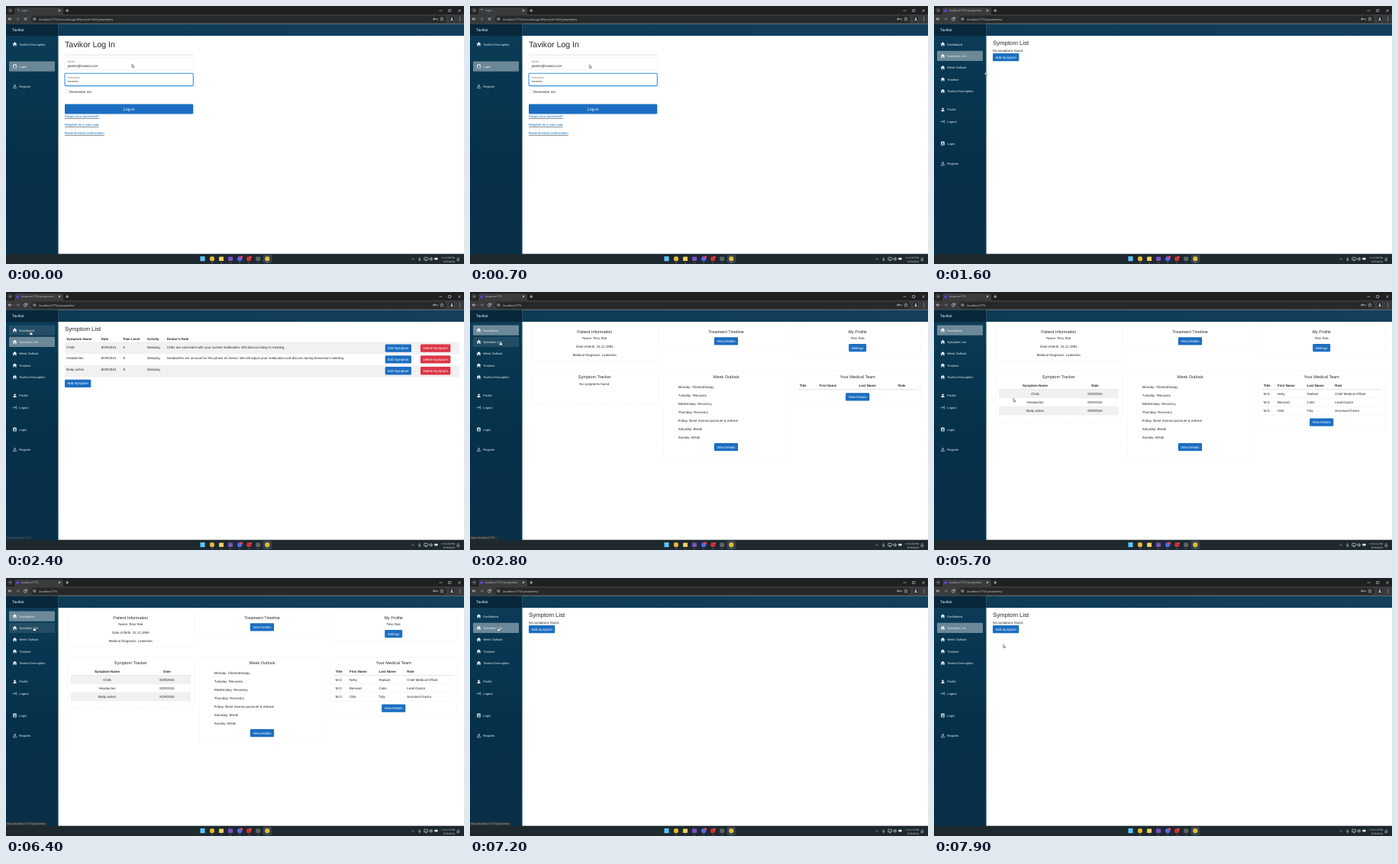
Animation, 600 px wide and 338 px high, one loop 8000 ms. Source, as an HTML page:

```html
<!DOCTYPE html>
<html lang="en">
<head>
<meta charset="utf-8">
<title>Patient portal</title>
<style>
html, body { margin: 0; width: 100%; height: 100%; overflow: hidden; background: #fff; }
svg { display: block; width: 600px; height: 338px; text-rendering: geometricPrecision; }
text { font: 4.38px "Liberation Sans", Arial, sans-serif; fill: #24282c; white-space: pre; }
.ui { font-family: "Open Sans", "Noto Sans", sans-serif; }
.b { font-weight: bold; }
.m { text-anchor: middle; }
.e { text-anchor: end; }
.line { fill: none; stroke: #d5d5d5; stroke-width: .8; stroke-linecap: round; stroke-linejoin: round; }
.card { fill: none; stroke: #f1f1f1; stroke-width: .6; stroke-dasharray: 3 1; }
</style>
</head>
<body>
<svg id="stage" viewBox="0 0 600 338"></svg>
<script>
const LOOP = 8000, BLUE = '#1b6ec2', RED = '#dc3545', WHITE = '#f4f6f8';
const APP = 'Tavikor', PATIENT = 'Tess Roe';

// Drawing helpers returning SVG markup
const text = (x, y, s, cls = '', size = 4.38, fill = '#24282c') =>
  `<text x="${x}" y="${y}" class="${cls}" style="font-size:${size}px;fill:${fill}">${s}</text>`;
const rect = (x, y, w, h, fill, r = 0, more = '') =>
  `<rect x="${x}" y="${y}" width="${w}" height="${h}" rx="${r}" fill="${fill}" ${more}/>`;
const disc = (x, y, r, fill) => `<circle cx="${x}" cy="${y}" r="${r}" fill="${fill}"/>`;
const line = (d, color = '#d5d5d5', width = .8) =>
  `<path class="line" d="${d}" style="stroke:${color};stroke-width:${width}"/>`;
const button = (x, y, w, s, fill = BLUE, h = 10.3, size = 4.38) =>
  rect(x, y, w, h, fill, 1.3) + text(x + w / 2, y + h / 2 + size * .35, s, 'm', size, '#fff');
const card = (x, y, h, w = 166) => `<rect class="card" x="${x}" y="${y}" width="${w}" height="${h}" rx="1.5"/>`;
const at = (x, y, s) => `<g transform="translate(${x} ${y})">${s}</g>`;
// A group visible only during the given [from, to) spans
const during = (spans, s) => `<g data-on="${spans}">${s}</g>`;

const ON = {
  login: '0-1000', user: '1000-8000',
  list: '1000-2600,7200-8000', listEmpty: '1000-2000,7200-8000', listFull: '2000-2600',
  dash: '2600-7200', dashEmpty: '2600-3400', dashFull: '3400-7200',
  busy: '0-1000,6700-7200', idle: '1000-6700,7200-8000'
};

function browser() {
  const address = (tab, url) => text(20, 7.4, tab, 'ui', 3.3, '#d6d6d6') + text(43, 18.6, url, 'ui', 3.6, '#e4e4e4');
  return rect(0, 0, 600, 11.5, '#1f2021') + rect(0, 11, 600, 12.5, '#3a3b3c') +
    rect(2, 2.3, 7, 7, '#343536', 2) + line('M4.3 5.2l1.2 1.2 1.2-1.2') +
    `<path d="M9 11.5q2 0 2-2V4q0-2 2-2h60q2 0 2 2v5.5q0 2 2 2z" fill="#3a3b3c"/>` +
    line('M69 4.9l2 2m0-2l-2 2M78.5 6h3.4M80.2 4.3v3.4') +
    line('M568 6h3M580 4.6h2.8v2.8h-2.8zM592.6 4.6l2.8 2.8m0-2.8l-2.8 2.8', '#d5d5d5', .6) +
    rect(32.5, 12.7, 544.5, 9, '#272829', 4.5) +
    line('M7.2 17H3.4m1.6-1.7L3.4 17 5 18.7') + line('M13.2 17h3.8m-1.6-1.7L17 17l-1.6 1.7', '#777') +
    during(ON.busy, line('M24 15.5l3 3m0-3l-3 3') + '<path id="spinner" class="line" d="M15.3 4.2a2 2 0 0 1 2 2" style="stroke:#8ab4f8"/>') +
    during(ON.idle, line('M27 16.2a1.9 1.9 0 1 0 .2 1.3M27.2 14.9v1.4h-1.4') + disc(15.3, 6.2, 2.1, '#5c3fc4') ) +
    disc(37.3, 17, 2.7, '#3c3d3e') + line('M36 16.2h2.6M36 17.8h2.6', '#d5d5d5', .6) +
    during(ON.login, address('Log in', 'localhost:7775/Account/Login?ReturnUrl=%2Fsymptomlist')) +
    during(ON.list, address('localhost:7775/symptomlist', 'localhost:7775/symptomlist')) +
    during(ON.dash, address('localhost:7775', 'localhost:7775')) +
    line('M562 17h3.4v1M561.6 17a1 1 0 1 0-2 0 1 1 0 1 0 2 0', '#d5d5d5', .7) +
    line('M571 14.8l.7 1.5 1.6.2-1.2 1.1.3 1.6-1.4-.8-1.4.8.3-1.6-1.2-1.1 1.6-.2z', '#d5d5d5', .5) +
    disc(584, 17, 2.9, '#1b1c1d') + disc(584, 16.1, 1, '#ddd') + rect(582.2, 17.5, 3.6, 1.6, '#ddd', .8) +
    [15, 17, 19].map(y => disc(594.5, y, .5, '#ddd')).join('');
}

const icons = {
  home: '<path d="M0-2.7L2.8 0H2v2.5H.7V.7H-.7v1.8H-2V0h-.8z" fill="#f4f6f8"/>',
  person: disc(0, -1.2, 1.2, WHITE) + '<path d="M-2.3 2.2q0-2 2.3-2t2.3 2z" fill="#f4f6f8"/>',
  exit: line('M-2.4 0H.8M-.4-1.1L.8 0-.4 1.1M2.2-1.8v3.6', '#cdd7de', .6),
  badge: rect(-2.2, -2.5, 4.4, 5, WHITE, .6) + disc(0, -.7, .9, '#0b3750') + rect(-1.4, .6, 2.8, 1.2, '#0b3750', .5),
  outline: `<circle class="line" cy="-1.1" r="1" style="stroke-width:.6"/>` + line('M-2.2 2q.2-1.7 2.2-1.7T2.2 2z', '#cdd7de', .6)
};
const navItem = ([label, y, icon]) => at(11.5, y, icons[icon]) + text(17.3, y + 1.5, label, '', 4.05, '#e3ebf0');
const marker = (y, alpha) => rect(4, y - 6.6, 60, 13.3, `rgba(255,255,255,${alpha})`, 1.2);

function sidebar() {
  const guest = [[APP + ' Description', 50, 'home'], ['Login', 79, 'badge'], ['Register', 105.3, 'outline']];
  const member = [['Dashboard', 50, 'home'], ['Symptom List', 65.4, 'home'], ['Week Outlook', 80.8, 'home'],
    ['Timeline', 96.1, 'home'], [APP + ' Description', 111.4, 'home'], ['Profile', 135.8, 'person'],
    ['Logout', 151.3, 'exit'], ['Login', 180, 'badge'], ['Register', 206.4, 'outline']];
  return rect(0, 23.5, 68.5, 302, 'url(#side)') + rect(0, 23.5, 68.5, 15.5, '#08273a') +
    rect(68.5, 23.5, 532, 15.5, 'url(#top)') + text(8, 33, APP, '', 5, '#fff') +
    during(ON.login, marker(79, .4) + guest.map(navItem).join('')) +
    during(ON.list, marker(65.4, .4)) + during(ON.dash, marker(50, .4)) +
    during('2250-2600', marker(50, .1)) + during('2700-3000,6200-7200', marker(65.4, .1)) +
    during(ON.user, member.map(navItem).join(''));
}

function loginPage() {
  const links = ['Forgot your password?', 'Register as a new user', 'Resend email confirmation'];
  return text(77, 54, APP + ' Log In', '', 10.6) + rect(77, 63.7, 168.5, .6, '#ccc') +
    rect(77, 68, 168.5, 15.5, '#fff', 1.3, 'stroke="#e6e8ea" stroke-width=".5"') +
    text(80.7, 74, 'Email', '', 3.6, '#777') + text(80.7, 79.9, `patient@${APP.toLowerCase()}.com`) +
    rect(77, 88.3, 168.3, 16.3, '#fff', 1.3, 'stroke="#3b8fe0" stroke-width="1.1"') +
    text(80.7, 94.6, 'Password', '', 3.6, '#777') +
    Array.from({ length: 9 }, (_, i) => disc(81.5 + i * 1.55, 98.8, .62, '#24282c')).join('') +
    rect(77.3, 109.8, 4.3, 4.3, '#fff', .8, 'stroke="#d0d3d6" stroke-width=".5"') + text(83, 113.6, 'Remember me') +
    button(77, 128.4, 168.3, 'Log in', BLUE, 13, 5.3) +
    links.map((s, i) => `<g text-decoration="underline">${text(77, 146.4 + i * 10.9, s, '', 4.38, '#006bb7')}</g>`).join('');
}

const symptoms = ['Chills', 'Headaches', 'Body aches'];

function listPage() {
  const cols = [79.3, 124.7, 153.5, 184.7, 210.8];
  const heads = ['Symptom Name', 'Date', 'Pain Level', 'Activity', "Doctor's Note"];
  const notes = ['Chills are consistent with your current medication. Will discuss today in meeting.',
    'Headaches are unusual for this phase of chemo. We will adjust your medication and discuss during tomorrow\'s meeting.', ''];
  const row = (name, i) => {
    const y = 66.5 + i * 14.8;
    return rect(77, y, 517, 14.8, i % 2 ? '#fff' : '#f1f1f1') + rect(77, y + 14.6, 517, .4, '#dee2e6') +
      [name, '8/29/2024', i ? 8 : 5, 'Sleeping', notes[i]].map((s, c) => text(cols[c], y + 7, s)).join('') +
      button(496.7, y + 2, 34.3, 'Edit Symptom') + button(543, y + 2, 39.3, 'Delete Symptom', RED);
  };
  return text(77, 51.2, 'Symptom List', '', 7.8) +
    during(ON.listEmpty, text(77, 60.2, 'No symptoms found.') + button(77, 62, 34.3, 'Add Symptom')) +
    during(ON.listFull, heads.map((s, c) => text(cols[c], 62.5, s, 'b')).join('') +
      rect(77, 66.1, 517, .5, '#c9cccf') + symptoms.map(row).join('') + button(77, 114.8, 34.3, 'Add Symptom'));
}

function dashboard() {
  const [A, B, C] = [163.3, 335.5, 507.7];
  const title = (x, y, s) => text(x, y, s, 'm', 5.48);
  const week = ['Monday: Chemotherapy', 'Tuesday: Recovery', 'Wednesday: Recovery', 'Thursday: Recovery',
    'Friday: Bone marrow puncture &amp; release', 'Saturday: Break', 'Sunday: Break'];
  const info = ['Name: ' + PATIENT, 'Date of Birth: 31.12.1994', 'Medical Diagnosis: Leukemia'];
  const heads = ['Title', 'First Name', 'Last Name', 'Role'];
  const cols = [431.7, 450, 488.5, 525.3];
  const team = [['M.D.', 'Nelly', 'Radiant', 'Chief Medical Officer'],
    ['M.D.', 'Bernard', 'Calm', 'Lead Doctor'], ['M.D.', 'Ollie', 'Tidy', 'Assistant Doctor']];
  const rowY = i => 127.8 + i * 11.1;
  const details = (x, y) => button(x - 15.6, y, 31.2, 'View Details');
  const sickRow = (s, i) => rect(85, rowY(i), 157, 11.1, i % 2 ? '#fff' : '#f1f1f1') +
    rect(85, rowY(i) + 10.9, 157, .35, '#dee2e6') +
    text(132.5, rowY(i) + 7, s, 'm') + text(211, rowY(i) + 7, '8/29/2024', 'm');
  const teamRow = (r, i) => r.map((s, c) => text(cols[c], rowY(i) + 7, s)).join('') +
    rect(429, rowY(i) + 10.9, 157, .35, '#e3e6e9');
  return card(81, 43.3, 47) + card(253, 43.3, 30) + card(425, 43.3, 39) + card(253, 103.5, 113.5) +
    title(A, 53.6, 'Patient Information') + info.map((s, i) => text(A, 62.1 + i * 10.9, s, 'm')).join('') +
    title(B, 53.6, 'Treatment Timeline') + details(B, 59.3) +
    title(C, 53.6, 'My Profile') + text(C, 62.1, PATIENT, 'm') + button(496.2, 68, 23, 'Settings') +
    title(A, 113.2, 'Symptom Tracker') + title(B, 113.2, 'Week Outlook') + title(C, 113.2, 'Your Medical Team') +
    week.map((s, i) => text(272.7, 126.3 + i * 10.92, s)).join('') + details(B, 198) +
    during(ON.dashEmpty, card(81, 103.5, 43) + card(425, 103.5, 44.5) + text(A, 121.6, 'No symptoms found.', 'm') +
      heads.map((s, c) => text([431.7, 457.5, 509.5, 561][c], 123.6, s, 'b')).join('') +
      rect(429, 127.5, 157, .6, '#c9cccf') + details(C, 132.2)) +
    during(ON.dashFull, card(81, 103.5, 67) + card(425, 103.5, 78) +
      text(132.5, 123.6, 'Symptom Name', 'b m') + text(211, 123.6, 'Date', 'b m') +
      rect(85, 127.3, 157, .5, '#c9cccf') + symptoms.map(sickRow).join('') +
      heads.map((s, c) => text(cols[c], 123.6, s, 'b')).join('') +
      rect(429, 127.3, 157, .5, '#c9cccf') + team.map(teamRow).join('') + details(C, 165.4));
}

function taskbar() {
  const apps = ['#e0b93c', '#f2cf5b', '#7d4fc0', '#5865f2', '#c8323c', '#59636a', '#e0b93c'];
  return rect(0, 324.7, 600, 13.3, '#1d292f') + rect(254.4, 328, 6.2, 6.2, '#5cc3f5', .5) +
    rect(336.6, 325.8, 11.4, 11, '#36434a', 1.5) +
    apps.map((c, i) => {
      const x = 270 + i * 12.05;
      const shape = [1, 2, 5].includes(i) ? rect(x - 3, 328.4, 6, 5.6, c, .7) : disc(x, 331.2, 3.1, c);
      return shape + rect(x - 1.2, 335.9, 2.4, .7, i === 6 ? '#5cc3f5' : '#8b959b', .3);
    }).join('') + disc(308.6, 329, 1.7, '#ed4245') + disc(320.6, 329, 1.3, '#e34b4b') +
    line('M531.6 332l1.4-1.4 1.4 1.4M541.8 329.4v2.4m-1.2-.3q0 1.5 1.2 1.5t1.2-1.5m-1.2 1.5v1', '#d5d5d5', .6) +
    line('M548.2 329.3h4v3.2h-4zm1 4.4h2M555 330.6h1l1.3-1.2v4l-1.3-1.2h-1zm3.4-.2q.8 1 0 2', '#e4e4e4', .6) +
    rect(561.4, 329.8, 4, 2.8, '#e4e4e4', .5) + rect(565.5, 330.6, .5, 1.2, '#e4e4e4') +
    '<text id="clock" class="ui e" x="588" y="331" style="font-size:3.15px;fill:#eee"></text>' +
    text(588, 335.6, '8/29/2024', 'ui e', 3.15, '#eee') +
    line('M590.8 333h3.2l-.5-.8v-1.3q0-1.3-1.1-1.3t-1.1 1.3v1.3zm1.2 1h.8', '#e4e4e4', .5);
}

function status(url, w) {
  return rect(0, 319.4, w, 5.5, '#243038') + text(1, 323.4, url, 'ui', 3.1, '#cfd6da');
}

stage.innerHTML = `<defs>
  <linearGradient id="side" x2="0" y2="1"><stop stop-color="#0c3d59"/><stop offset=".25" stop-color="#083650"/>
    <stop offset=".6" stop-color="#06304a"/><stop offset="1" stop-color="#0a2f48"/></linearGradient>
  <linearGradient id="top"><stop stop-color="#0d3b56"/><stop offset="1" stop-color="#143f5c"/></linearGradient></defs>` +
  rect(0, 0, 600, 338, '#fff') + browser() + sidebar() +
  during(ON.login, loginPage()) + during(ON.list, listPage()) + during(ON.dash, dashboard()) +
  during('2350-2500', `<g opacity=".45">${status('https://localhost:7775', 36)}</g>`) +
  during('2500-3000', status('https://localhost:7775', 36)) +
  during('6300-7900', status('https://localhost:7775/symptomlist', 54)) + taskbar() +
  `<g id="pointer" stroke="#333" stroke-width=".5" fill="#fff" stroke-linejoin="round">
    <path id="arrow" d="M0 0v4.3l1-.9.7 1.6.7-.3-.7-1.5h1.4z"/>
    <path id="hand" d="M-.5 0q.5-.6 1 0v1.7l2 .5q.5.2.4.8l-.4 1.8h-2.7l-1.6-2q.2-.6.9-.1l.4.3z"/></g>`;

// Pointer stops: time, x, y
const path = [[0, 165, 76], [500, 165, 76], [1600, 66.8, 86.5], [2400, 32, 51.5], [2550, 32, 51.5], [2800, 39.5, 65],
  [3000, 42, 67], [3600, 125, 121], [4100, 171.7, 214.8], [5150, 171.7, 214.8], [6250, 36.5, 64.5],
  [7800, 37, 65], [7900, 90.7, 87], [8000, 90.7, 87]];
const timed = [...stage.querySelectorAll('[data-on]')].map(el =>
  [el, el.dataset.on.split(',').map(s => s.split('-').map(Number))]);
const show = (el, on) => { el.style.display = on ? '' : 'none'; };
const $ = id => document.getElementById(id);
const start = performance.now();

function draw(now) {
  const t = Math.max(0, now - start) % LOOP;
  for (const [el, spans] of timed) show(el, spans.some(([a, b]) => t >= a && t < b));

  const i = path.findIndex(p => p[0] > t);
  const [a, b] = [path[i - 1], path[i]];
  const k = (t - a[0]) / (b[0] - a[0]), ease = k * k * (3 - 2 * k);
  const x = a[1] + (b[1] - a[1]) * ease, y = a[2] + (b[2] - a[2]) * ease;
  $('pointer').setAttribute('transform', `translate(${x} ${y})`);
  const overNav = x < 64 && y < 73;
  show($('hand'), overNav);
  show($('arrow'), !overNav);

  $('spinner').setAttribute('transform', `rotate(${t * .45} 15.3 6.2)`);
  const sec = 6 + Math.floor((t + 700) / 1000);
  $('clock').textContent = `11:01:${String(sec).padStart(2, '0')} PM`;
  requestAnimationFrame(draw);
}
draw(start);
</script>
</body>
</html>
```
